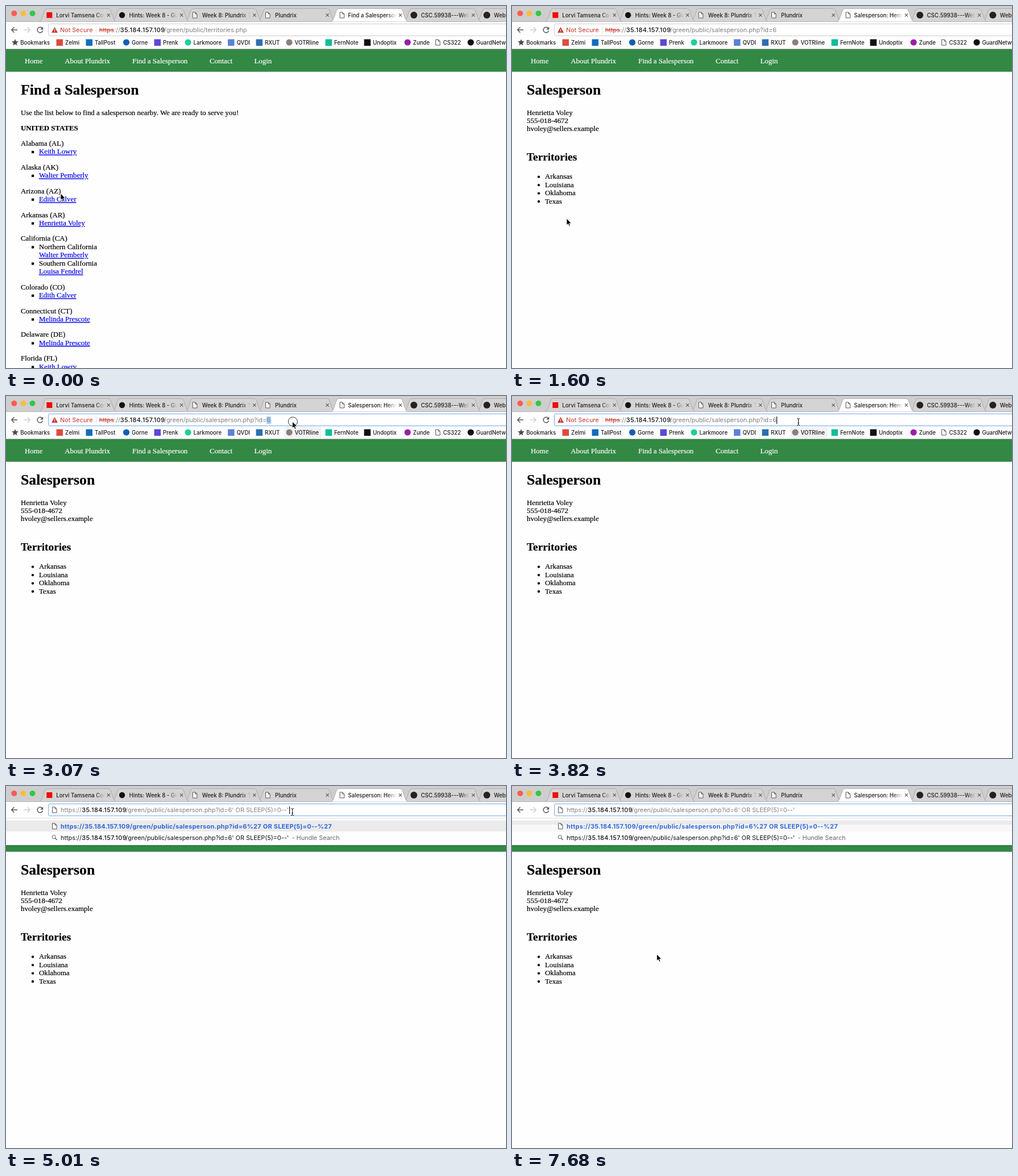
Write an HTML page that moves like this. It is 879 by 637 pixels and loops after 8 s.

```html
<!DOCTYPE html>
<html lang="en">
<head>
<meta charset="utf-8">
<title>Find a Salesperson</title>
<style>
html, body { margin: 0; width: 100%; height: 100%; overflow: hidden; background: #fefefe; }
svg { display: block; }
#stage { width: 100vw; height: 100vh; }
.ui { font: 500 9.65px Inter, Roboto, sans-serif; fill: #1c1c1c; }
.url { font: 400 10.9px Inter, Roboto, sans-serif; fill: #808080; }
.url .host { fill: #111; }
.url .ip { fill: #111; font-weight: 500; letter-spacing: .43px; }
.url .warn { fill: #c5392f; }
.url .pick { fill: #3367d6; font-size: 11px; font-weight: 700; letter-spacing: .23px; }
.url .note { fill: #666; }
.page { font: 12.88px "Liberation Serif", "Times New Roman", serif; }
.page text { fill: #000; stroke: #000; stroke-width: .2; }
.page .h1 { font-size: 25.76px; font-weight: 700; }
.page .h2 { font-size: 19.3px; font-weight: 700; }
.page .bold { font-weight: 700; }
.page .link { fill: #0000ee; stroke: #0000ee; text-decoration: underline; }
.page .nav { fill: #fff; stroke: #fff; }
.line { fill: none; stroke: #5a5a5a; }
</style>
</head>
<body>
<svg id="stage" viewBox="0 0 879 637" preserveAspectRatio="none"></svg>
<script>
const LOOP = 8000, TICK = 147.7, LEAD = 35;

const text = (x, y, s, cls = '') => `<text x="${x}" y="${y}" class="${cls}">${s}</text>`;
const rect = (x, y, w, h, fill, more = '') =>
  `<rect x="${x}" y="${y}" width="${w}" height="${h}" fill="${fill}" ${more}/>`;
const dot = (x, y, r, fill) => `<circle cx="${x}" cy="${y}" r="${r}" fill="${fill}"/>`;
const line = (d, color = '#5a5a5a', w = 1, more = '') =>
  `<path class="line" d="${d}" style="stroke:${color};stroke-width:${w}" ${more}/>`;
const group = (id, body, cls = '') => `<g id="${id}" class="${cls}">${body}</g>`;
const sheet = (x, y) => // document icon, centred
  `<path d="M${x - 3.5},${y - 5}h4.5l3,3v7h-7.5z M${x + 1},${y - 5}v3h3" fill="#fff" stroke="#555"/>`;

// Tab strip
const PITCH = 128.25, ACTIVE = 4;
const titles = ['Lorvi Tamsena Cor', 'Hints: Week 8 - Guard', 'Week 8: Plundrix Tas', 'Plundrix', '',
  'CSC.59938---Web Se', 'Web Sec'];

function tabIcon(i, x) {
  if (i === 0) return rect(x + 1, 11, 10, 10, '#f00b0b');
  if (i === 1) return dot(x + 5.5, 16, 5.2, '#111');
  if (i > ACTIVE) return dot(x + 5.5, 16, 6, '#24211f');
  return i === ACTIVE ? '' : sheet(x + 5, 16);
}

function tab(i) {
  const x = 58 + PITCH * i, tx = 88.3 + PITCH * i, on = i === ACTIVE, cx = 180.3 + PITCH * i;
  const shape = `M${x},27.5q3,-.5 4.5,-4l5.5,-15.5q1.3,-3.5 4,-3.5h108q2.7,0 4,3.5l5.5,15.5q1.5,3.5 4.5,4`;
  const title = on ? text(0, 19.5, 'Find a Salesperson', 'title') : text(0, 19.5, titles[i]);
  return `<path d="${shape}" fill="${on ? '#fefefe' : '#d4d4d4'}" stroke="#a6a6a6" stroke-width=".9"/>` +
    tabIcon(i, tx - 18) +
    `<svg x="${tx}" y="0" width="86" height="27">${title}</svg>` +
    rect(tx + 69, 8, 18, 16, `url(#fade${on ? 'On' : 'Off'})`) +
    line(`M${cx - 2.6},13.4l5.2,5.2m0,-5.2l-5.2,5.2`, '#555', 1.1);
}

const fade = (id, c) => `<linearGradient id="${id}"><stop offset="0" stop-color="${c}" stop-opacity="0"/>` +
  `<stop offset=".9" stop-color="${c}"/></linearGradient>`;

const strip = `<defs>${fade('fadeOn', '#fefefe')}${fade('fadeOff', '#d4d4d4')}
  <linearGradient id="shade" x2="0" y2="1"><stop offset="0" stop-color="#000" stop-opacity=".1"/>
  <stop offset="1" stop-color="#000" stop-opacity="0"/></linearGradient></defs>` +
  rect(0, 0, 879, 27, '#cecece') +
  ['#fc5b57', '#fdbc40', '#33c748'].map((c, i) => dot(14.3 + 16.1 * i, 13, 5, c)).join('') +
  [6, 5, 3, 2, 1, 0].map(tab).join('') + line('M0,27.5H879', '#b4b4b4') + tab(ACTIVE) +
  group('tabDoc', sheet(590.5, 16)) +
  group('spinner', line('M0,-5A5,5 0 0 1 3.2,3.9', '#5b86d8', 1.6));

// Toolbar
const HTTPS = 'https', PATH = '/green/public/salesperson.php?id=6', HOST = '35.184.157.109';
const INJECT = "' OR SLEEP(5)=0--'";

// Address split at its host; cls colours the parts around it
const address = (y, cls) => text(96, y, HTTPS + '://', cls) + text(133.3, y, HOST, 'ip') +
  text(210.3, y, PATH, cls) + text(397.3, y, INJECT, cls);

const toolbar = rect(0, 28, 879, 48, '#fefefe') +
  line('M20,42H10M14.5,37.2L9.7,42l4.8,4.8', '#555', 1.4) +
  line('M31.5,42H42M37.5,37.2l4.8,4.8l-4.8,4.8', '#cfcfcf', 1.4) +
  group('reload', line('M63.8,39.2A4.8,4.8 0 1 0 64.6,43.4', '#555', 1.4) +
    '<path d="M65.2,36.6v4.8h-4.8z" fill="#555"/>') +
  group('stop', line('M55.8,38l8.6,8.6m0,-8.6l-8.6,8.6', '#555', 1.5)) +
  rect(74.5, 31.5, 820, 21, '#fff', 'id="box" rx="2.5"') +
  rect(0, 36, 0, 13, '#a8cdf6', 'id="select"') +
  group('address',
    '<path d="M85.5,37L91,47H80z" fill="#c5392f"/>' + line('M85.5,40.5v3.2m0,.9v1.2', '#fff', 1.1) +
    text(95, 46, 'Not Secure', 'warn') + line('M158.5,36V48', '#ddd') +
    `<text x="163.7" y="46" class="warn" text-decoration="line-through">${HTTPS}</text>` +
    text(190, 46, '://') + text(200.8, 46, HOST, 'ip') +
    '<text id="path" x="278" y="46"></text>', 'url') +
  group('typed', sheet(85, 42) + address(46, ''), 'url') +
  rect(0, 36, 1.1, 13, '#000', 'id="caret"');

// Bookmarks: label, text x, icon shape, icon colour
const marks = [
  ['Zelmi', 104, 's', '#dd4b3e'], ['TallPost', 156, 's', '#0f6cbf'], ['Gorne', 221, 'c', '#1260b4'],
  ['Prenk', 276, 's', '#5a49d8'], ['Larkmoore', 329.5, 'c', '#21ce99'], ['QVDI', 405.5, 's', '#5b82d8'],
  ['RXUT', 455, 's', '#2a6fb0'], ['VOTRline', 507.5, 'c', '#8d7f78'], ['FernNote', 577, 's', '#0dbe98'],
  ['Undoptix', 645, 's', '#111'], ['Zunde', 715.5, 'c', '#9a1fa8'], ['CS322', 768.5, 'd'],
  ['GuardNetwork', 826.5, 'c', '#111']];

function bookmark([label, x, kind, color]) {
  const icon = kind === 'd' ? sheet(x - 9.5, 64)
    : kind === 'c' ? dot(x - 9.5, 64, 5.6, color) : rect(x - 15.5, 58.5, 11.5, 11.5, color);
  return icon + text(x, 67.5, label);
}

function star(x, y, r) {
  const pts = [...Array(10).keys()].map(i => {
    const a = i * Math.PI / 5, k = i % 2 ? r * .43 : r;
    return `${x + k * Math.sin(a)},${y - k * Math.cos(a)}`;
  });
  return `<polygon points="${pts.join(' ')}" fill="#4a4a4a"/>`;
}

const bookmarks = rect(489, 54, 66, 20, '#f2f2f2', 'id="hover" rx="2"') +
  star(16, 64.3, 6.3) + text(25.3, 67.5, 'Bookmarks') + marks.map(bookmark).join('') +
  line('M0,75.5H879', '#b8b8b8');

// Pages
const nav = rect(0, 76, 879, 39.7, '#338844') +
  [['Home', 33], ['About Plundrix', 103.3], ['Find a Salesperson', 222], ['Contact', 358], ['Login', 436.5]]
    .map(([s, x]) => text(x, 100.7, s, 'nav')).join('');

const ROW = 14.49, GAP = 12.88;
const [keith, walter, edith, henri, louisa, melinda] =
  ['Keith Lowry', 'Walter Pemberly', 'Edith Calver', 'Henrietta Voley', 'Louisa Fendrel', 'Melinda Prescote'];
const states = [['Alabama (AL)', keith], ['Alaska (AK)', walter], ['Arizona (AZ)', edith],
  ['Arkansas (AR)', henri], ['California (CA)', ['Northern California', walter], ['Southern California', louisa]],
  ['Colorado (CO)', edith], ['Connecticut (CT)', melinda], ['Delaware (DE)', melinda], ['Florida (FL)', keith]];

function territories() {
  let y = 246, out = text(26, 156, 'Find a Salesperson', 'h1') +
    text(26, 191.5, 'Use the list below to find a salesperson nearby. We are ready to serve you!') +
    text(26, 218.7, 'UNITED STATES', 'bold');
  for (const [state, ...items] of states) {
    out += text(26, y, state);
    for (const item of items) {
      y += ROW;
      out += rect(45, y - 5.6, 4.2, 4.2, '#000');
      if (Array.isArray(item)) {
        out += text(58, y, item[0]);
        y += ROW;
      }
      out += text(58, y, [].concat(item).pop(), 'link');
    }
    y += ROW + GAP;
  }
  return out;
}

const person = text(26, 156, 'Salesperson', 'h1') +
  [henri, '555-018-4672', 'hvoley@sellers.example'].map((s, i) => text(26, 191.5 + ROW * i, s)).join('') +
  text(26, 272, 'Territories', 'h2') +
  ['Arkansas', 'Louisiana', 'Oklahoma', 'Texas'].map((s, i) =>
    dot(47, 300.6 + ROW * i, 2.2, '#000') + text(58, 304.2 + ROW * i, s)).join('');

// Suggestion list under the address box
const dropdown = rect(0, 104, 879, 3, 'url(#shade)') + rect(0, 53, 879, 51, '#fefefe') +
  line('M0,56.5H879', '#dedede') +
  rect(0, 60.5, 879, 7.5, '#ebebeb') + rect(0, 68, 879, 12, '#ebebeb', 'id="row"') +
  sheet(85, 70.7) +
  text(96, 74.8, `${HTTPS}://${HOST}${PATH}%27 OR SLEEP(5)=0--%27`, 'pick') +
  `<circle cx="84.2" cy="89.6" r="3" class="line"/>` + line('M86.4,91.8l3.2,3.2', '#5a5a5a', 1.4) +
  address(94.8, 'host') + text(502.5, 94.8, '- Hundle Search', 'note');

const pointer = group('arrow', '<path d="M0,0V11.6L2.7,9.2L4.5,13.3L6.4,12.5L4.7,8.4H8.3Z" fill="#000" ' +
    'stroke="#fff" stroke-width=".8"/>') +
  group('hand', '<path d="M-2,1.2Q-1,-.6 .2,1.2V6L1.2,5.2Q2.4,4.8 2.9,6Q4.4,5.3 4.9,6.8Q6.6,6.4 6.6,8.2' +
    'Q6.8,11 4.9,12.6V15H-1.6V13.2Q-3,11.4 -4.8,8.6Q-4.6,7 -2,9Z" fill="#fff" stroke="#111" stroke-width="1"/>' +
    line('M.6,9.5v3m1.7,-3v3m1.7,-3v3', '#111', .6)) +
  group('beam', line('M-2.4,-5.3Q0,-5.3 0,-4Q0,-5.3 2.4,-5.3M0,-4V5.2M-2.4,6.5Q0,6.5 0,5.2Q0,6.5 2.4,6.5M-1.3,2.5h2.6', '#111')) +
  group('ring', '<circle cx=".8" r="8" class="line" style="stroke:#333"/>');

const stage = document.getElementById('stage');
stage.innerHTML = rect(0, 0, 879, 637, '#fefefe') + group('chrome', strip + toolbar + bookmarks, 'ui') +
  group('nav', nav, 'page') + group('list', territories(), 'page') + group('person', person, 'page') +
  group('dropdown', dropdown, 'url') + group('pointer', pointer);

const $ = id => document.getElementById(id);
const show = (id, on) => $(id).setAttribute('display', on ? 'inline' : 'none');
const set = (id, attrs) => { for (const k in attrs) $(id).setAttribute(k, attrs[k]); };
const title = stage.querySelector('.title');

// Pointer keys: tick, x, y
const track = [[0, 96, 330], [1, 96, 350], [2, 94, 366], [4, 86, 393], [5, 85.5, 390], [6, 87, 384],
  [10, 87, 384], [11, 96, 374], [12, 150, 322], [14, 410, 112], [15, 485, 58], [16, 503.5, 45],
  [42, 503.5, 45], [43, 500, 51], [44, 480, 72], [47, 375, 150], [49, 312, 188], [50, 290, 197], [52, 254.5, 296]];

function place(k) {
  const j = track.findIndex(p => p[0] >= k);
  if (j < 0) return track[track.length - 1].slice(1);
  if (j === 0) return track[0].slice(1);
  const [a, x0, y0] = track[j - 1], [b, x1, y1] = track[j], u = (k - a) / (b - a);
  return [x0 + (x1 - x0) * u, y0 + (y1 - y0) * u];
}

function draw(ms) {
  const k = Math.floor((ms + LEAD) / TICK); // screen refresh count
  const within = (a, b) => k >= a && k < b;
  const loading = within(9, 11), loaded = k >= 11, typed = k >= 34;

  show('list', !loaded);
  show('person', loaded);
  show('reload', !loading);
  show('stop', loading);
  show('tabDoc', !loading);
  show('spinner', loading);
  set('spinner', { transform: `translate(591.5 16) rotate(${(k - 9) * 53})` });
  title.textContent = loaded ? 'Salesperson: Henrietta' : 'Find a Salesperson';

  $('path').textContent = k < 9 ? '/green/public/territories.php' : PATH;
  show('address', !typed);
  show('typed', typed);
  show('dropdown', typed);
  show('hover', within(15, 34));
  set('row', { fill: k < 45 ? '#ebebeb' : '#f8f8f8' });
  set('box', { stroke: k < 18 ? '#cdcdcd' : '#75a7e8' });

  const from = within(18, 21) ? 163 : 458;
  set('select', { x: from, width: within(18, 25) ? 466 - from : 0 });
  set('caret', { x: typed ? 498 : 465 });
  show('caret', [[25, 28], [32, 38], [41, 45], [48, 51]].some(([a, b]) => within(a, b)));

  const [x, y] = place(k), hand = within(5, 11), beam = within(25, 44);
  set('pointer', { transform: `translate(${x} ${y})` });
  show('hand', hand);
  show('beam', beam);
  show('arrow', !hand && !beam);
  show('ring', [9, 18, 21, 25].includes(k));
}

function frame(now) {
  draw(now % LOOP);
  requestAnimationFrame(frame);
}
draw(0);
requestAnimationFrame(frame);
</script>
</body>
</html>
```
